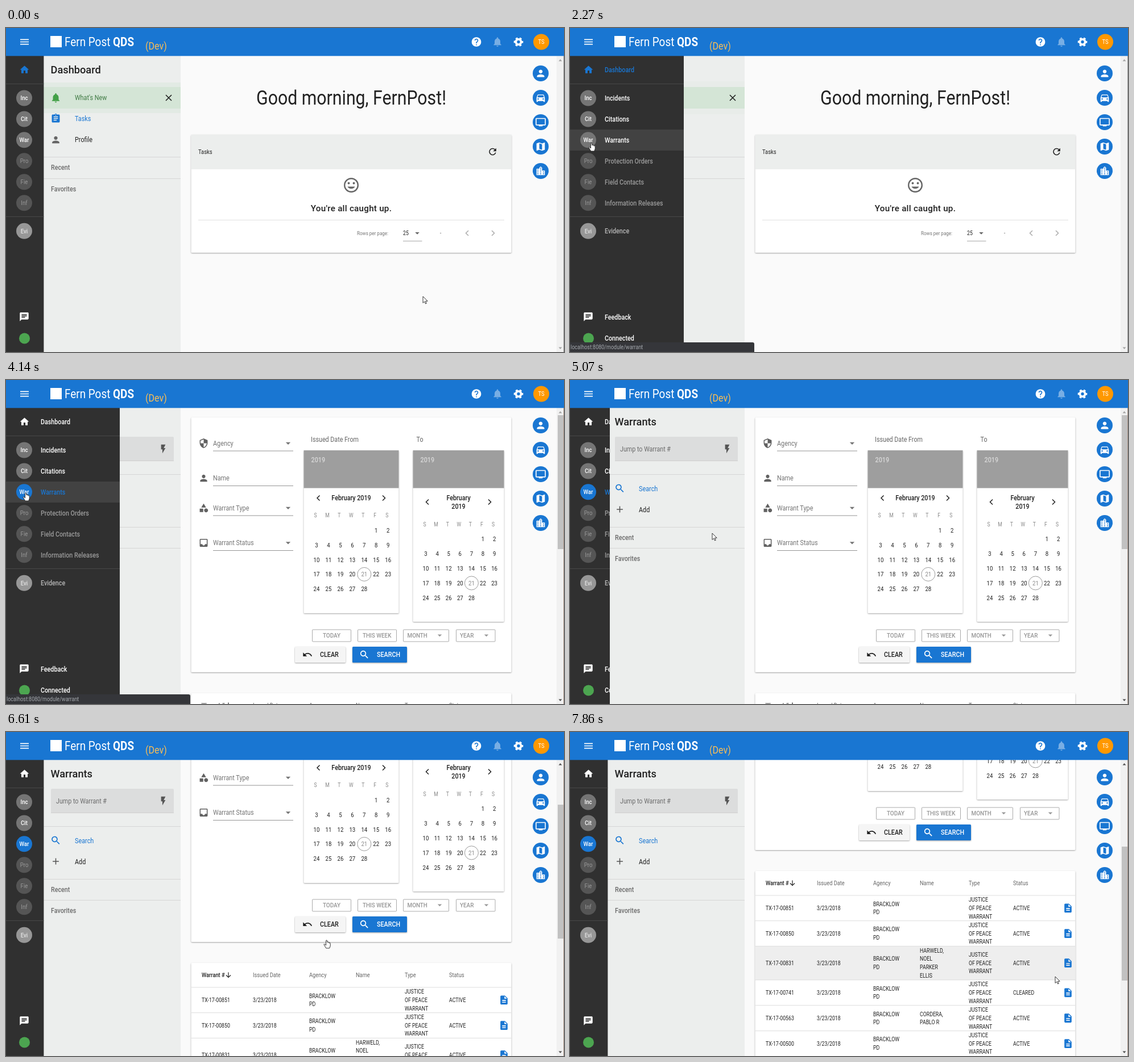
Animation of 981 by 571 pixels, one loop 8000 ms. Source, as an HTML page:

```html
<!DOCTYPE html>
<html lang="en">
<head>
<meta charset="utf-8">
<title>Records dashboard</title>
<style>
html, body { margin: 0; width: 100%; height: 100%; overflow: hidden; background: #fafafa; }
svg { display: block; font-family: Roboto, sans-serif; }
.up { filter: drop-shadow(0 1px 1px rgba(0,0,0,.36)); }
</style>
</head>
<body>
<svg id="stage" width="981" height="571" viewBox="0 0 981 571"></svg>
<script>
const BLUE = '#1976d2', INK = '#212121', GRAY = '#757575', PALE = '#eceeed', LINE = '#d6d6d6';
const NARROW = 0.86; // most of the interface uses one condensed cut
const RAIL = 66.4;

const icons = {
  menu: 'M3 18h18v-2H3zM3 13h18v-2H3zM3 6v2h18V6z',
  home: 'M10 20v-6h4v6h5v-8h3L12 3 2 12h3v8z',
  help: 'M12 2a10 10 0 1 0 .01 0zm1 17h-2v-2h2v2zm2.07-7.75l-.9.92C13.45 12.9 13 13.5 13 15h-2v-.5c0-1.1.45-2.1 1.17-2.83l1.24-1.26c.37-.36.59-.86.59-1.41 0-1.1-.9-2-2-2s-2 .9-2 2H8c0-2.21 1.79-4 4-4s4 1.79 4 4c0 .88-.36 1.68-.93 2.25z',
  bell: 'M12 22c1.1 0 2-.9 2-2h-4c0 1.1.89 2 2 2zm6-6v-5c0-3.07-1.64-5.64-4.5-6.32V4c0-.83-.67-1.5-1.5-1.5s-1.5.67-1.5 1.5v.68C7.63 5.36 6 7.92 6 11v5l-2 2v1h16v-1l-2-2z',
  person: 'M12 12a4 4 0 1 0-.01 0zm0 2c-2.67 0-8 1.34-8 4v2h16v-2c0-2.66-5.33-4-8-4z',
  tasks: 'M19 3h-4.18C14.4 1.84 13.3 1 12 1s-2.4.84-2.82 2H5c-1.1 0-2 .9-2 2v14c0 1.1.9 2 2 2h14c1.1 0 2-.9 2-2V5c0-1.1-.9-2-2-2zm-7 0a1 1 0 1 1-.01 0zm2 14H7v-2h7v2zm3-4H7v-2h10v2zm0-4H7V7h10v2z',
  car: 'M18.92 6C18.72 5.42 18.16 5 17.5 5h-11c-.66 0-1.21.42-1.42 1L3 12v8c0 .55.45 1 1 1h1c.55 0 1-.45 1-1v-1h12v1c0 .55.45 1 1 1h1c.55 0 1-.45 1-1v-8zM6.5 16a1.5 1.5 0 1 1 .01 0zm11 0a1.5 1.5 0 1 1 .01 0zM5 11l1.5-4.5h11L19 11z',
  screen: 'M21 3H3c-1.1 0-2 .9-2 2v12c0 1.1.9 2 2 2h5v2h8v-2h5c1.1 0 2-.9 2-2V5c0-1.1-.9-2-2-2zm0 14H3V5h18z',
  map: 'M20.5 3L15 5.1 9 3 3.4 4.9 3 5.4v15.1l.5.5L9 18.9l6 2.1 5.6-1.9.4-.5V3.5zM15 19l-6-2.1V5l6 2.1z',
  city: 'M15 11V5l-3-3-3 3v2H3v14h18V11zm-8 8H5v-2h2zm0-4H5v-2h2zm0-4H5V9h2zm6 8h-2v-2h2zm0-4h-2v-2h2zm0-4h-2V9h2zm0-4h-2V5h2zm6 12h-2v-2h2zm0-4h-2v-2h2z',
  refresh: 'M17.65 6.35A8 8 0 1 0 19.73 14h-2.08A6 6 0 1 1 16.22 7.78L13 11h7V4z',
  chat: 'M20 2H4c-1.1 0-2 .9-2 2v18l4-4h14c1.1 0 2-.9 2-2V4c0-1.1-.9-2-2-2zM6 9h12v2H6zm8 5H6v-2h8zm4-6H6V6h12z',
  shield: 'M12 1L3 5v6c0 5.55 3.84 10.74 9 12 5.16-1.26 9-6.45 9-12V5zm0 11h7c-.53 4.12-3.28 7.79-7 8.94V12H5V6.3l7-3.1z',
  shapes: 'M12 2l-5.5 9h11zM17.5 13a4.5 4.5 0 1 0 .01 0zM3 13.5h8v8H3z',
  inbox: 'M19 3H5c-1.1 0-2 .9-2 2v14c0 1.1.9 2 2 2h14c1.1 0 2-.9 2-2V5c0-1.1-.9-2-2-2zm0 12h-4a3 3 0 0 1-6 0H5V5h14z',
  bolt: 'M7 2v11h3v9l7-12h-4l4-8z',
  search: 'M15.5 14h-.8l-.27-.27A6.5 6.5 0 1 0 13.73 14.43l.27.28v.79l5 5L20.5 19zm-6 0a4.5 4.5 0 1 1 .01 0z',
  undo: 'M12.5 8c-2.65 0-5.05 1-6.9 2.6L2 7v9h9l-3.62-3.62c1.39-1.16 3.16-1.88 5.12-1.88 3.54 0 6.55 2.31 7.6 5.5l2.37-.78C21.08 11.03 17.15 8 12.5 8z',
  doc: 'M14 2H6c-1.1 0-2 .9-2 2v16c0 1.1.89 2 2 2h12c1.1 0 2-.9 2-2V8zm2 16H8v-2h8zm0-4H8v-2h8zm-3-5V3.5L18.5 9z',
  caret: 'M7 10l5 5 5-5z',
  plus: 'M19 13h-6v6h-2v-6H5v-2h6V5h2v6h6z'
};

// y is the vertical middle of the text
const text = (x, y, s, size, fill = INK, weight = 400, anchor = 'start', more = '') =>
  `<text transform="translate(${x} ${y + size * .355}) scale(${NARROW} 1)" font-size="${size}" fill="${fill}" font-weight="${weight}" text-anchor="${anchor}" ${more}>${s}</text>`;
const mid = (x, y, s, size, fill, weight) => text(x, y, s, size, fill, weight, 'middle');
const wide = (x, y, s, size, more = '') =>
  `<text x="${x}" y="${y + size * .355}" font-size="${size}" fill="${INK}" font-weight="500" ${more}>${s}</text>`;
const rect = (x, y, w, h, fill, more = '') => `<rect x="${x}" y="${y}" width="${w}" height="${h}" fill="${fill}" ${more}/>`;
const disc = (x, y, r, fill, more = '') => `<circle cx="${x}" cy="${y}" r="${r}" fill="${fill}" ${more}/>`;
const icon = (name, x, y, size, fill) =>
  `<path transform="translate(${x - size / 2} ${y - size / 2}) scale(${size / 24})" d="${icons[name]}" fill="${fill}" fill-rule="evenodd"/>`;
const stroke = (d, color, width = 1) => `<path d="${d}" fill="none" stroke="${color}" stroke-width="${width}"/>`;
const hline = (x1, x2, y, color = LINE) => rect(x1, y, x2 - x1, 1, color);
const chevron = (x, y, dir, color) => stroke(`M${x - dir * 2} ${y - 4.5}l${dir * 4.5} 4.5l${-dir * 4.5} 4.5`, color, 1.5);
const group = (id, body, more = '') => `<g id="${id}" ${more}>${body}</g>`;
const card = (x, y, w, h, fill = '#fff') => rect(x, y, w, h, fill, 'rx="1.5" class="up"');

function header() {
  const gear = disc(901, 24.5, 4.6, 'none', 'stroke="#fff" stroke-width="3.8"') +
    disc(901, 24.5, 7, 'none', 'stroke="#fff" stroke-width="2.6" stroke-dasharray="3.67" stroke-dashoffset="1.8"');
  return rect(0, 0, 981, 49.3, BLUE) + icon('menu', 32.5, 24.5, 20, '#fff') +
    rect(78, 14, 20, 20, '#fff') + text(103, 24.5, 'Fern Post <tspan font-weight="700">QDS</tspan>', 22, '#fff') +
    text(245, 31.5, '(Dev)', 18.7, '#f9bd55') +
    icon('help', 827, 24.5, 20, '#fff') + icon('bell', 864, 24.5, 20, '#78aee4') + gear +
    disc(941, 24.5, 14, '#ff9800') + mid(941, 24.5, 'TS', 11, '#fff');
}

function rail() {
  const items = [['Incidents', 123.5, 1], ['Citations', 160.5, 1], ['Warrants', 197.3, 1], ['Protection Orders', 234.3, 0],
    ['Field Contacts', 271.3, 0], ['Information Releases', 308.3, 0], ['Evidence', 357.8, 2]];
  const label = (y, s, color, more) => text(61, y, s, 12.5, color, 500, 'start', more);
  const tint = mode => ['#9a9a9a', '#fff', '#b5b5b5'][mode];
  const badges = items.map(([name, y, mode], i) =>
    disc(32, y, 14, ['#555', '#757575', '#979797'][mode], i === 2 ? 'id="warDisc"' : '') +
    mid(32, y, name.slice(0, 3), 11.2, mode === 2 ? '#e4e4e4' : tint(mode), mode ? 500 : 400)).join('');
  const labels = label(73.5, 'Dashboard', 'currentColor', 'class="home"') +
    items.map(([name, y, mode], i) => label(y, name, tint(mode), i === 2 ? 'id="warText"' : '')).join('') +
    label(509.5, 'Feedback', '#fff') + label(546.5, 'Connected', '#fff');
  return rect(0, 49, 200, 522, '#303030') + group('rowHover', rect(0, 179, 200, 37, '#424242')) +
    hline(0, 200, 98, '#484848') + hline(0, 200, 332, '#484848') +
    icon('home', 32.5, 73.5, 19, 'currentColor') + badges +
    icon('chat', 32, 509, 18.5, '#fff') + disc(32.5, 547, 9.5, '#4ca550') + group('labels', labels);
}

const sections = (y1, y2) => hline(66, 307, y1) + text(79, y1 + 19, 'Recent', 12.5, '#6c6c6c', 500) +
  hline(66, 307, y2) + text(79, y2 + 19, 'Favorites', 12.5, '#6c6c6c', 500);

function dashboard() {
  const nav = rect(66, 49, 241, 522, PALE) + wide(78.5, 73.5, 'Dashboard', 18.2) +
    rect(66, 104, 241, 38, '#4caf50', 'id="pulse"') + rect(66, 104, 241, 38, '#d4e5d6') +
    icon('bell', 87.5, 123, 20, '#43a047') + text(121, 123, 'What\'s New', 12.6, '#3f7a43') +
    stroke('M281 118l10 10m0-10l-10 10', INK, 1.6) +
    icon('tasks', 87.5, 159.5, 18.5, BLUE) + text(121, 160, 'Tasks', 12.6, BLUE) +
    icon('person', 87.5, 197, 19, '#666') + text(121, 197, 'Profile', 12.6) + sections(227, 265);
  const face = disc(607, 277, 11.8, 'none', 'stroke="#666" stroke-width="2.4"') + disc(602.5, 273.5, 1.9, '#666') +
    disc(611.5, 273.5, 1.9, '#666') + '<path d="M600.5 279.5h13a7 6 0 0 1-13 0z" fill="#666"/>';
  return nav + mid(607, 122.5, 'Good morning, FernPost!', 35.2, INK) +
    card(325.5, 188, 563, 208) + rect(325.5, 188, 563, 61, PALE) +
    text(338, 218.3, 'Tasks', 10.9) + icon('refresh', 855.5, 218, 19, INK) +
    group('taskHover', rect(338, 262, 538, 77, '#eee')) + hline(338, 876, 338, '#e0e0e0') + face +
    wide(607, 318, 'You\'re all caught up.', 15.2, 'text-anchor="middle" letter-spacing=".25"') +
    text(617, 361.8, 'Rows per page:', 9.4, GRAY) + text(698, 361.8, '25', 10.3) + icon('caret', 723, 361.5, 18, '#666') +
    hline(698, 731.5, 375, '#a8a8a8') + mid(764, 361, '-', 11, GRAY) +
    chevron(811, 361.5, -1, '#acacac') + chevron(856, 361.5, 1, '#acacac');
}

function calendar(x, w, h, month, x0, dx, yDays, hover) {
  let s = card(x, 124, w, h) + rect(x, 124, w, 66.5, '#9e9e9e') + text(x + 13, 141, '2019', 12.6, '#d8d8d8', 500) + month;
  [...'SMTWTFS'].forEach((c, i) => s += mid(x0 - 2 + dx * i, yDays, c, 10, '#888'));
  for (let d = 1; d <= 28; d++) {
    const cell = d + 4, cx = x0 + dx * (cell % 7), cy = yDays + 26.5 + 25.8 * Math.floor(cell / 7);
    if (d === 21) s += disc(cx, cy, 12, 'none', 'stroke="#999"');
    if (d === 25 && hover) s += disc(cx, cy, 12, '#e0e0e0', 'id="dayHover"');
    s += mid(cx, cy, d, 11.2, d === 21 ? '#8a8a8a' : INK);
  }
  return s;
}

const rows = [
  ['851', 'ACTIVE', [], 44.7], ['850', 'ACTIVE', [], 44.7], ['831', 'ACTIVE', ['HARWELD,', 'NOEL', 'PARKER', 'ELLIS'], 59.5],
  ['741', 'CLEARED', [], 44.9], ['563', 'ACTIVE', ['CORDERA,', 'PABLO R'], 44.9], ['500', 'ACTIVE', [], 44.9]];
let rowTop = 595;
for (const r of rows) { r.top = rowTop; rowTop += r[3]; }

function table() {
  const lines = (x, y, list) => list.map((s, i) => text(x, y + (i - (list.length - 1) / 2) * 14.7, s, 10.2)).join('');
  let s = card(325.5, 552, 563, 340) + text(344, 573, 'Warrant #', 10.8, INK, 500) +
    stroke('M391 568.5v9m-4-4l4 4l4-4', INK, 1.2);
  [[434, 'Issued Date'], [533, 'Agency'], [615, 'Name'], [701, 'Type'], [779, 'Status']]
    .forEach(([x, name]) => s += text(x, 573, name, 10.8, '#666'));
  s += rect(325.5, 0, 563, 0, '#eee', 'id="lineHover"');
  for (const r of rows) {
    const [no, status, name, h] = r, y = r.top + h / 2;
    s += hline(325.5, 888.5, r.top - .5, '#ddd') + lines(344, y, ['TX-17-00' + no]) + lines(434, y, ['3/23/2018']) +
      lines(533, y, ['BRACKLOW', 'PD']) + lines(615, y, name) + lines(701, y, ['JUSTICE', 'OF PEACE', 'WARRANT']) +
      lines(779, y, [status]) + icon('doc', 875.5, y, 19, BLUE);
  }
  return s;
}

function warrants() {
  const nav = rect(66, 49, 241, 522, PALE) + wide(78.5, 73.5, 'Warrants', 18.2) +
    rect(79, 100, 216, 43, '#dcdddd', 'rx="2"') + hline(79, 295, 142, '#cfcfcf') + text(88, 121.5, 'Jump to Warrant #', 12.5, '#6c6c6c') +
    icon('bolt', 276.5, 121.5, 18.5, '#555') + hline(66, 307, 166) +
    icon('search', 87.5, 191, 19.5, BLUE) + text(121, 191.5, 'Search', 12.6, BLUE) +
    icon('plus', 87.5, 228, 18.5, '#555') + text(121, 228.5, 'Add', 12.6) + sections(259, 296);
  let s = card(325.5, 66, 563, 449);
  [['shield', 'Agency', 111.5, 1], ['person', 'Name', 173, 0], ['shapes', 'Warrant Type', 225.5, 1], ['inbox', 'Warrant Status', 287, 1]]
    .forEach(([ic, name, y, drop]) => s += icon(ic, 347.5, y, 18.5, '#616161') + text(364, y, name, 12.6, GRAY) +
      hline(364, 505, y + 13, '#949494') + (drop ? icon('caret', 496, y, 20, GRAY) : ''));
  s += text(536, 105, 'Issued Date From', 12.5, '#666') + text(721.5, 105, 'To', 12.5, '#666');
  s += calendar(523.5, 167, 287, mid(607, 208, 'February 2019', 12.5, INK, 500) + chevron(549.5, 208, -1, INK) +
    chevron(664, 208, 1, INK), 546, 20.95, 238.5, true);
  s += calendar(715.5, 160, 302, mid(795.5, 207.5, 'February', 12.5, INK, 500) + mid(795.5, 223, '2019', 12.5, INK, 500) +
    chevron(741, 215, -1, INK) + chevron(850, 215, 1, INK), 738, 20.1, 254, false);
  [['TODAY', 538.5, 68, 557], ['THIS WEEK', 618.5, 68, 627], ['MONTH', 698.5, 80, 705.5, 762.5], ['YEAR', 791.5, 68.5, 798, 844.5]]
    .forEach(([name, x, w, tx, cx]) => s += rect(x, 440, w, 21, '#fff', 'stroke="#aaa" rx="1"') +
      text(tx, 450, name, 11.5, '#969696', 500) + (cx ? icon('caret', cx, 450, 18, '#999') : ''));
  s += card(508, 470, 89, 28, '#f5f5f5') + icon('undo', 530, 484, 18.5, INK) + text(552, 484, 'CLEAR', 12.5, INK, 500) +
    card(609, 470, 96, 28, BLUE) + icon('search', 630, 484, 19, '#fff') + text(652, 484, 'SEARCH', 12.5, '#fff', 500);
  return group('scroller', s + table()) + nav;
}

const tools = () => ['person', 'car', 'screen', 'map', 'city']
  .map((name, i) => disc(940, 80 + 43 * i, 14, BLUE) + icon(name, 940, 80 + 43 * i, 19.5, '#fff')).join('');

const stage = document.getElementById('stage');
stage.innerHTML = '<clipPath id="railClip"><rect id="railBox" y="49" height="522"/></clipPath>' +
  rect(0, 0, 981, 571, '#fafafa') + group('dash', dashboard()) + group('warr', warrants()) + tools() +
  rect(968, 49, 13, 522, '#f1f1f1') + rect(970, 62, 10, 236, '#c1c1c1', 'id="thumb"') +
  '<path id="upArrow" d="M971.5 58.5h6l-3-3.5z"/><path id="downArrow" d="M971.5 562.5h6l-3 3.5z"/>' +
  rect(980, 49, 1, 522, '', 'id="edge"') +
  group('rail', rail(), 'clip-path="url(#railClip)"') + header() +
  group('status', '<path d="M0 554h321q3 0 3 3v14H0z" fill="#35363a"/>' +
    text(1, 562.5, 'localhost:8080/module/warrant', 10.5, '#a4a8ad')) +
  group('pointer', '<path id="arrow" d="M0 0v11.5l2.7-2.5 1.8 4 1.8-.8-1.8-3.9h3.7z"/>' +
    '<path id="hand" d="M-1.5 1v8l-2-2c-1-1-2 0-1.3 1l3.5 6h6l1.5-4v-4.5c0-1.5-1.8-1.5-1.8-.2v-1c0-1.4-1.8-1.4-1.8 0v-.6c0-1.4-1.9-1.4-1.9 0V1c0-1.5-2.2-1.5-2.2 0z"/>',
    'fill="#fff" stroke="#222" stroke-width=".9" stroke-linejoin="round"');

const el = {};
stage.querySelectorAll('[id]').forEach(e => el[e.id] = e);
const show = (e, on) => e.style.display = on ? '' : 'none';
const set = (e, attrs) => { for (const a in attrs) e.setAttribute(a, attrs[a]); };

// Keys are [step, value, ...], linear in between
function at(keys, k) {
  let i = keys.findIndex(key => key[0] >= k);
  if (i < 0) i = keys.length - 1;
  const b = keys[i], a = keys[Math.max(0, i - 1)];
  const u = b === a || k > b[0] ? 1 : (k - a[0]) / (b[0] - a[0]);
  return b.slice(1).map((v, j) => a[j + 1] + (v - a[j + 1]) * u);
}

const path = [[0, 733, 473], [1, 715, 462], [3, 590, 405], [5, 400, 320], [6, 307, 279], [7, 210, 245], [8, 120, 220],
  [9, 60, 205], [10, 40, 203], [14, 36, 203], [17, 35, 199], [26, 35, 199], [27, 42, 202], [28, 90, 220], [29, 170, 250],
  [31, 330, 290], [33, 472, 315], [34, 510, 335], [36, 564, 366], [37, 564, 367], [44, 564, 367], [45, 625, 385],
  [46, 700, 420], [47, 775, 431], [48, 853, 431]];
const railWidth = [[0, RAIL], [9, RAIL], [10, 120], [11, 182], [12, 200], [28, 200], [29, 120], [30, 70], [31, RAIL]];
const scroll = [[0, 0], [37, 0], [38, 20], [39, 92], [40, 145], [41, 200], [42, 224], [43, 295], [44, 307]];

const FIRST = 558, STEP = 155.1; // the picture advances in held steps

function draw(now) {
  const t = now % 8000;
  const k = t < FIRST ? 0 : 1 + Math.floor((t - FIRST) / STEP);
  const [x, y] = at(path, k), [w] = at(railWidth, k), [top] = at(scroll, k);
  const onWarrants = k >= 21, chosen = k >= 20;

  show(el.dash, !onWarrants);
  show(el.warr, onWarrants);
  show(el.thumb, onWarrants);
  show(el.taskHover, k >= 4 && k <= 6);
  show(el.rowHover, k >= 9 && k <= 28);
  show(el.status, k >= 9 && k <= 29);
  show(el.dayHover, k >= 36 && k <= 39);

  const phase = (.56 + (k ? FIRST + (k - 1) * STEP : 0) / 2000) % 1;
  const p = phase < .7 ? phase / .7 : 1 - (phase - .7) / .3, spread = 10 * p;
  set(el.pulse, { y: 104 - spread, height: 38 + 2 * spread, 'fill-opacity': phase < .7 ? .2 * (1 - p) + .02 : 0 });

  set(el.railBox, { width: w });
  show(el.labels, w > RAIL);
  el.rail.style.color = chosen ? '#fff' : BLUE;
  set(el.warDisc, { fill: chosen ? BLUE : '#757575' });
  set(el.warText, { fill: chosen ? BLUE : '#fff' });

  set(el.scroller, { transform: `translate(0 ${-top})` });
  set(el.thumb, { y: 62 + top * .456 });
  set(el.upArrow, { fill: top ? '#505050' : '#a3a3a3' });
  set(el.downArrow, { fill: onWarrants ? '#505050' : '#a3a3a3' });
  set(el.edge, { fill: k >= 16 ? '#a58f82' : '#959595' });
  const over = k >= 43 && rows.find(r => y + top >= r.top && y + top < r.top + r[3]);
  set(el.lineHover, over ? { y: over.top, height: over[3] } : { height: 0 });

  const hand = k >= 9 && k <= 28 || k >= 36 && k <= 40;
  show(el.hand, hand);
  show(el.arrow, !hand);
  set(el.pointer, { transform: `translate(${x} ${y})` });
}

const start = performance.now();
(function tick() {
  draw(performance.now() - start);
  requestAnimationFrame(tick);
})();
</script>
</body>
</html>
```
